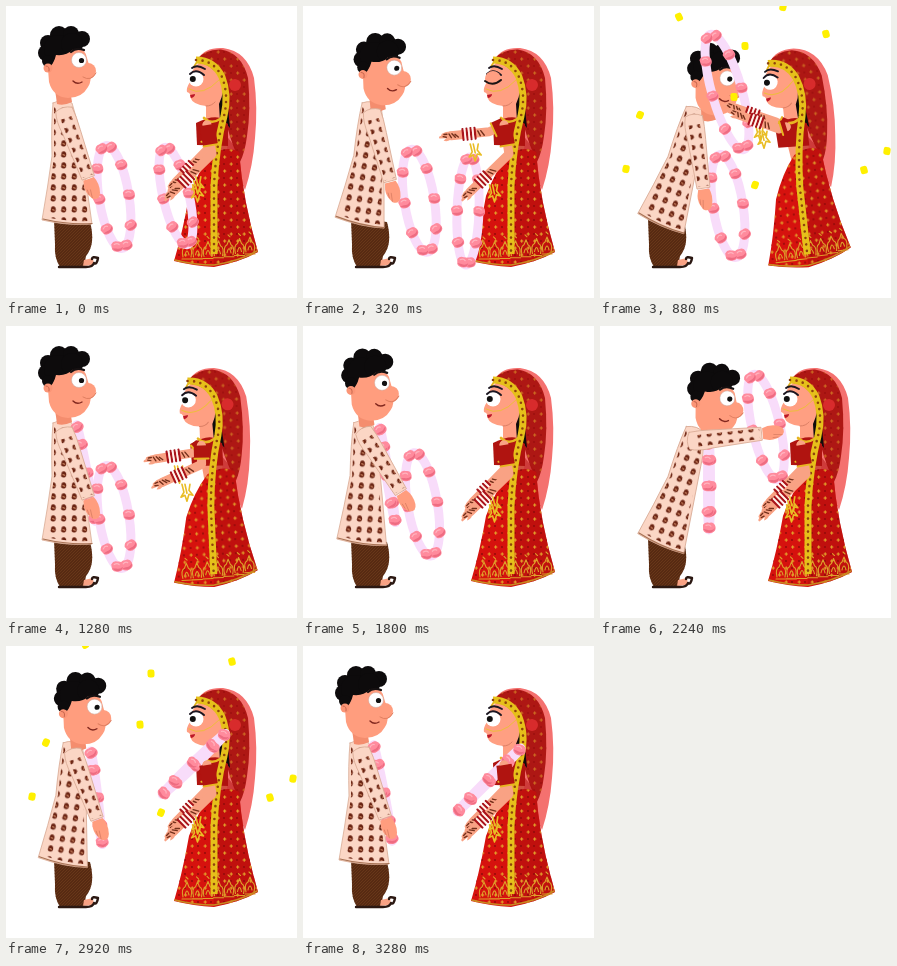
An HTML page that plays this animation: 291 px wide and 292 px high, repeating every 4.4 s.

```html
<!DOCTYPE html>
<html lang="en">
<head>
<meta charset="utf-8">
<title>Garland exchange</title>
<style>
  html, body { margin: 0; width: 100%; height: 100%; overflow: hidden; background: #fff; }
  svg { display: block; width: 100vw; height: 100vh; }
</style>
</head>
<body>
<svg viewBox="0 0 291 292" fill="none" stroke-linecap="round" stroke-linejoin="round">
  <defs>
    <pattern id="paisley" width="10.5" height="11" patternUnits="userSpaceOnUse">
      <path d="M3 4.5Q3 1.5 6.5 2.5Q9 5 7 8Q4 9.5 2.5 7Z" fill="#6b2413"/>
      <path d="M4.6 5.6l1.6 .6" stroke="#d18a66" stroke-width="1.2"/>
    </pattern>
    <pattern id="spots" width="13" height="14" patternUnits="userSpaceOnUse">
      <path d="M3 4h2.4M4.2 2.8v2.4M9.5 11h2.4M10.7 9.8v2.4" stroke="#e3a52a" stroke-width="1.1"/>
      <circle cx="10" cy="4" r=".9" fill="#8c0808"/><circle cx="4" cy="11" r=".9" fill="#8c0808"/>
    </pattern>
    <pattern id="weave" width="3" height="3" patternUnits="userSpaceOnUse">
      <path d="M0 3L3 0" stroke="#74401f" stroke-width=".6"/>
    </pattern>
    <g id="flower">
      <path d="M-6 -2Q-4 -6 0 -5Q5 -6 6 -1Q7 4 2 5Q-3 6 -5 3Z" fill="#ff8b9d"/>
      <path d="M-5 2Q-2 5 2 4.5Q6 3 5.5 0Q3 3 -1 2Z" fill="#ee6c82"/>
      <path d="M-3 -2Q0 -4 2 -2" stroke="#ffb3bf" stroke-width="1.2"/>
    </g>
    <g id="hand">
      <path d="M-12 -3.5L1 -4Q5 -6 8 -4L5 -2L12 -1.5Q13 .5 10 1L9 3Q4 5 -1 4L-12 3.5Z" fill="#f9a284"/>
      <path d="M-7 -2l3 3M-4 -2l3 4M0 -2l2 4M5 -1l3 1M4 2l3 0M-33 -3l3 5M-29 -3l2 5" stroke="#74301b" stroke-width="1.4"/>
      <path d="M-24 -5.5v11M-20 -5.5v11M-16 -5.5v11M-12 -5.5v11" stroke="#a8141b" stroke-width="2.2"/>
      <path d="M-22 -5v10M-18 -5v10M-14 -5v10" stroke="#fff3ee" stroke-width="1.8"/>
    </g>
  </defs>

  <g id="legs">
    <path id="trousers" d="M48 212L84 216Q90 238 80 250L78 260L54 261Q48 252 49 238Z" fill="#572a12"/>
    <path d="M48 212L84 216Q90 238 80 250L78 260L54 261Q48 252 49 238Z" fill="url(#weave)"/>
    <path d="M78 254L87 252L88 259L77 260Z" fill="#f9a284"/>
    <path d="M53 261L80 261Q87 261 88 257Q91 259 92 252Q86 250 86 253" stroke="#2b1812" stroke-width="2.4"/>
  </g>
  <g id="robe">
    <path d="M47 97Q57 92 66 97L72 118L86 218Q62 220 36 214Q42 180 46 150Q45 118 47 97Z" fill="#fbd6c5" stroke="#d9ab95" stroke-width=".8"/>
    <path d="M48 99Q57 95 65 99L70 120L83 215Q62 216 39 211Q45 180 48 150Z" fill="url(#paisley)"/>
    <path d="M37 213Q62 219 86 217.5" stroke="#a87355" stroke-width="1.2"/>
  </g>
  <g id="head">
    <path d="M48 76L51 98Q58 100 66 96L64 84Z" fill="#f48d6e"/>
    <g fill="#0d0b0c">
      <circle cx="42" cy="37" r="8"/><circle cx="53" cy="29" r="9"/><circle cx="65" cy="28" r="8"/>
      <circle cx="76" cy="33" r="8"/><circle cx="40" cy="47" r="8"/><circle cx="52" cy="43" r="14"/>
      <circle cx="66" cy="38" r="11"/><circle cx="42" cy="55" r="6"/>
    </g>
    <path d="M42 63Q48 58 50 49Q61 50 66 44Q79 40 81 52L84 62Q86 76 82 81Q76 92 62 92Q47 91 43 76Z" fill="#ff9d7e"/>
    <circle cx="82" cy="65" r="8" fill="#ff9d7e"/>
    <path d="M77 71Q85 76 90 67" stroke="#e07f61" stroke-width="1"/>
    <circle cx="42" cy="62" r="4.5" fill="#fb9576"/><path d="M40 60q4 0 3 5" stroke="#c9674f"/>
    <circle cx="73" cy="54" r="7.5" fill="#fff" stroke="#c9a79c" stroke-width=".5"/>
    <circle cx="75.5" cy="54.5" r="2.6" fill="#111"/>
    <path d="M65 46Q70 41 78 44" stroke="#151011" stroke-width="2.2"/>
    <path d="M67 75Q71 79 76 76" stroke="#82281f" stroke-width="1.4"/>
  </g>

  <g id="bride">
    <path d="M192 53Q199 41 217 42Q241 45 248 72Q252 102 249 132Q247 160 239 184L219 140Z" fill="#f4716f"/>
    <path d="M190 54Q199 43 215 43.5Q236 47 242 72Q245 105 241 130Q239 146 234 156Q226 139 221 120L216 80Z" fill="#ae1714"/>
    <path d="M190 54Q199 43 215 43.5Q236 47 242 72Q245 105 241 130Q239 146 234 156Q226 139 221 120L216 80Z" fill="url(#spots)" opacity=".6"/>
    <path d="M194 55Q212 54 219 72L224 122Q215 110 207 109L204 95Z" fill="#100b0c"/>
    <path d="M193 57Q184 64 184 76Q180 82 181 86Q185 87 184 91Q187 99 200 100L200 114L214 116L213 98Q220 84 214 72Q206 58 193 57Z" fill="#ff9f82"/>
    <path d="M200 100q6 0 9 -4" stroke="#dc7f65" stroke-width="1"/>
    <circle cx="229" cy="79" r="6" fill="#d82b2c"/>
    <path d="M183 83Q197 91 213 74" stroke="#edbe3b" stroke-width="1"/>
    <path d="M184 89L189 88Q189 91 185 92Z" fill="#bb1728"/>
    <path d="M191 56q-2 3 -3 5" stroke="#e7b622" stroke-width="2"/>
    <circle cx="190" cy="73" r="7.5" fill="#fff"/><circle cx="186.8" cy="73" r="3" fill="#111"/>
    <path d="M184 68Q190 62 198 69M186 62Q191 58 199 63" stroke="#1b1620" stroke-width="1.9"/>
    <g id="lid">
      <circle cx="190" cy="73" r="8" fill="#ff9f82"/>
      <path d="M182 75Q190 81 198 74" stroke="#1b1414" stroke-width="2"/>
    </g>
    <path d="M200 134L222 132L220 152L203 156Z" fill="#f9987a"/>
    <path d="M190 117Q206 109 214 112L222 118L222 140L191 139Z" fill="#b01410"/>
    <path d="M198 112Q205 119 214 113" stroke="#e7b622" stroke-width="2.6"/>
    <path id="skirt" d="M206 148Q222 139 233 146Q237 195 252 246Q234 256 208 261Q188 260 168 255Q177 225 183 190Q192 165 206 148Z" fill="#d6120e"/>
    <path d="M216 124L233 146Q237 195 252 246Q232 257 208 260Q205 190 216 124Z" fill="#b01010" opacity=".55"/>
    <path d="M206 148Q222 139 233 146Q237 195 252 246Q234 256 208 261Q188 260 168 255Q177 225 183 190Q192 165 206 148Z" fill="url(#spots)"/>
    <g id="hem"></g>
    <path d="M169 254Q188 259 208 259Q234 255 251 245" stroke="#c98a20" stroke-width="1.6"/>
    <path d="M190 54Q208 54 216 71Q223 89 218 110Q210 140 208 180L208 248" stroke="#e6c01a" stroke-width="7" stroke-linecap="butt"/>
    <path d="M190 54Q208 54 216 71Q223 89 218 110Q210 140 208 180L208 248" stroke="#8f430d" stroke-width="2.6" stroke-dasharray="0 6.5"/>
  </g>
  <g id="garlands"></g>
  <g id="sleeve">
    <path d="M-4 -9Q6 -10 20 -9L68 -6.5L68 6.5L18 9Q4 11 -5 8Q-9 0 -4 -9Z" fill="#fbd6c5" stroke="#d9ab95" stroke-width=".8"/>
    <path d="M4 -5.5L66 -5.5L66 5L4 6Z" fill="url(#paisley)"/>
    <path d="M69 -5.5Q77 -9 86 -6Q93 -3 89 3Q82 8 75 7L69 5.5Z" fill="#ff9d7e"/>
    <path d="M80 2l8 1M79 5l5 0" stroke="#dc7f65" stroke-width=".8"/>
  </g>
  <g id="arms"></g>
  <g id="petals" fill="#fff000"></g>
</svg>
<script>
const LOOP = 4400, STEP = 40;
const $ = id => document.getElementById(id);
const add = (parent, tag, attrs = {}) => {
  const el = document.createElementNS('http://www.w3.org/2000/svg', tag);
  for (const k in attrs) set(el, k, attrs[k]);
  return parent.appendChild(el);
};
const set = (el, name, value) => el.setAttribute(name, value);
const place = (el, x, y, deg = 0) => set(el, 'transform', `translate(${x} ${y}) rotate(${deg})`);
const ramp = (t, a, b) => Math.min(1, Math.max(0, (t - a) / (b - a)));
const pulse = (t, a, b, c, d) => ramp(t, a, b) - ramp(t, c, d);
const mix = (p, q, u) => p.map((v, i) => v + (q[i] - v) * u);
const offset = (p, d, u) => p.map((v, i) => v + d[i] * u);

function turn(x, y, deg, cx, cy) {
  const r = deg * Math.PI / 180, c = Math.cos(r), s = Math.sin(r);
  return [cx + (x - cx) * c - (y - cy) * s, cy + (x - cx) * s + (y - cy) * c];
}

// A garland is a tilted ellipse: centre x, y, radii, angle. Worn, it folds flat.
const FLOWERS = 10;
function makeGarland() {
  const g = add($('garlands'), 'g');
  const ribbon = add(g, 'ellipse', { stroke: '#f8dcfa', 'stroke-width': 9 });
  const flowers = Array.from({ length: FLOWERS }, () => add(g, 'use', { href: '#flower' }));
  return ([cx, cy, rx, ry, deg]) => {
    place(g, cx, cy, deg);
    set(ribbon, 'rx', rx);
    set(ribbon, 'ry', ry);
    flowers.forEach((f, i) => {
      const a = (i + .5) / FLOWERS * 2 * Math.PI;
      place(f, rx * Math.sin(a), -ry * Math.cos(a), i * 67 % 50 - 25);
    });
  };
}

// Blend through states in turn: [state, start, end].
const chain = (t, start, ...moves) =>
  moves.reduce((p, [state, a, b]) => mix(p, state, ramp(t, a, b)), start);

const firstPath = (t, lean) => chain(t, [170, 190, 13, 50, -13],
  [[165, 205, 11, 54, 2], 120, 320],
  [[142, 82, 14, 52, -10], 320, 640],
  [[127, 86, 15, 60, -16], 640, 800],
  [offset([80, 147, 1.5, 49, -11], [29, 13, 0, -5, 11], lean), 960, 1240]);

const secondPath = (t, lean) => chain(t, offset([108, 191, 15, 52, -9], [20, 9, 0, 0, 0], lean),
  [[166, 101, 14, 54, -13], 1720, 2240],
  [[208, 85, 20, 45, 15], 2440, 2680],
  [[188, 117, 2, 44, 46], 2680, 2900],
  [[186, 134, 1.5, 45, 45], 2900, 3240]);

// Bride's arm, mixed between hanging and reaching: elbow x, y, hand x, y.
function makeArm(hanging, reaching) {
  const g = add($('arms'), 'g');
  const skin = add(g, 'path', { stroke: '#f9a284', 'stroke-width': 9 });
  const sleeve = add(g, 'path', { stroke: '#b01410', 'stroke-width': 15, 'stroke-linecap': 'butt' });
  const cuff = add(g, 'path', { d: 'M0 -7V7', stroke: '#e7b622', 'stroke-width': 2 });
  const tassel = add(g, 'path', {
    d: 'M-4 -8L-2 0L-5 5L-1 3L1 9L3 2L7 3L3 -2L4 -8M-1 -8L1 1', stroke: '#e9bd25', 'stroke-width': 1.6
  });
  const hand = add(g, 'use', { href: '#hand' });
  const angle = (x, y) => Math.atan2(y, x) * 180 / Math.PI;
  return (shoulder, reach) => {
    const p = mix(hanging, reaching, reach), elbow = p.slice(0, 2), [hx, hy] = p.slice(2);
    const [sx, sy] = shoulder, [ex, ey] = elbow, [mx, my] = mix(shoulder, elbow, .7);
    set(skin, 'd', `M${sx} ${sy}L${ex} ${ey}L${hx} ${hy}`);
    set(sleeve, 'd', `M${sx} ${sy}L${mx} ${my}`);
    place(cuff, mx, my, angle(ex - sx, ey - sy));
    place(tassel, hx + (ex - hx) * .45 + 6, hy + (ey - hy) * .45 + 18);
    place(hand, hx, hy, angle(hx - ex, hy - ey));
  };
}

const drawFirst = makeGarland(), drawSecond = makeGarland();
const farArm = makeArm([203, 142, 170, 176], [176, 116, 135, 102]);
const nearArm = makeArm([206, 148, 167, 186], [179, 123, 139, 109]);

for (let i = 0; i < 7; i++) {
  place(add($('hem'), 'path', {
    d: 'M-4 6Q-6 -2 -2 -4L0 -9L2 -4Q6 -2 4 6M-2 4Q0 -4 2 4M-5 8H5M-1 -14L1 -12', stroke: '#dda02b', 'stroke-width': 1.1
  }), 181 + i * 10.5, 245 - 5 * (i / 6) ** 2);
}

const drops = [[79, 11], [183, 1], [145, 40], [226, 28], [40, 109], [26, 163], [134, 91], [264, 164], [155, 179], [287, 145]];
drops.forEach(([x, y], i) => add($('petals'), 'rect', {
  x: x - 3.5, y: y - 4, width: 7, height: 8, rx: 2.5, transform: `rotate(${i * 37 % 50 - 25} ${x} ${y})`
}));

function draw(t) {
  const bow = pulse(t, 120, 600, 960, 1240);
  const give = pulse(t, 1720, 2240, 2640, 3080);
  const lean = bow + give;
  const tilt = 19 * lean, drift = -18 * lean * (1 - lean);
  set($('robe'), 'transform', `translate(${drift} 0) rotate(${tilt} 56 216)`);
  set($('head'), 'transform', `translate(${53 * lean + drift} ${17 * lean}) rotate(${5 * lean} 58 70)`);
  const [ax, ay] = turn(59, 108, tilt, 56, 216);
  place($('sleeve'), ax + drift, ay, 70 + 12 * bow - 76 * pulse(t, 1720, 2240, 2680, 2900));

  const sway = -6.3 * pulse(t, 320, 640, 960, 1480);
  set($('bride'), 'transform', `rotate(${sway} 210 255)`);
  set($('lid'), 'visibility', t >= 200 && t < 440 ? 'visible' : 'hidden');
  const shoulder = turn(201, 119, sway, 210, 255);
  farArm(shoulder, pulse(t, 120, 440, 1080, 1560));
  nearArm(shoulder, pulse(t, 320, 640, 960, 1480));

  drawFirst(firstPath(t, lean));
  drawSecond(secondPath(t, lean));

  // Both showers share one fall, the second 2080 ms later.
  const fall = t >= 2760 ? t - 2080 : t;
  set($('petals'), 'visibility', fall >= 680 && fall < 1200 ? 'visible' : 'hidden');
  place($('petals'), 0, (fall - 880) * .31);
}

function tick() {
  draw(Math.floor(performance.now() % LOOP / STEP) * STEP);
  requestAnimationFrame(tick);
}
tick();
</script>
</body>
</html>
```
